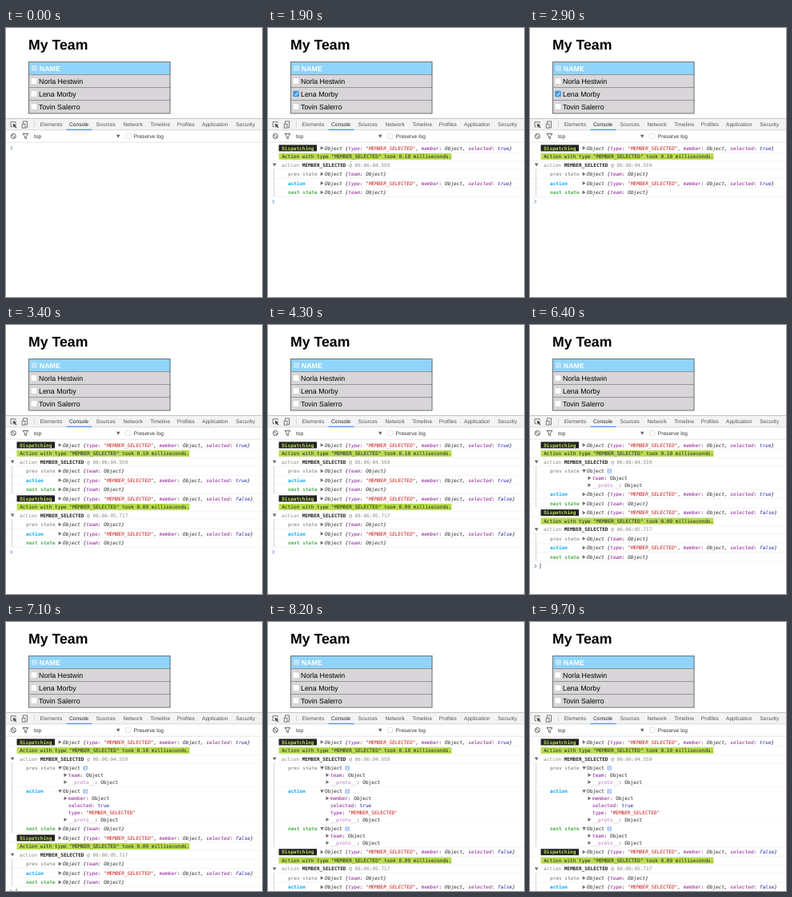
An HTML page that plays this animation: 320x337 px, repeating every 9800 ms.

```html
<!DOCTYPE html>
<html lang="en">
<head>
<meta charset="utf-8">
<title>My Team</title>
<style>
  html, body { margin: 0; width: 100%; height: 100%; overflow: hidden; background: #fff; }
  svg { display: block; width: 320px; height: 337px; }
  text { white-space: pre; text-rendering: geometricPrecision; }
  .ui { font-family: "Liberation Sans", Arial, sans-serif; }
  .mono { font: 6.08px "DejaVu Sans Mono", monospace; }
  .b { font-weight: bold; }
  .i { font-style: italic; }
</style>
</head>
<body>
<svg id="stage" viewBox="0 0 320 337" xmlns="http://www.w3.org/2000/svg">
  <g id="page"></g>
  <g id="tools"></g>
  <g id="log"></g>
</svg>
<script>
const LOOP = 9800;
const CHAR = 3.66;
const CHILD = 8.85;

// Moments of the clicks, in ms
const AT = { select: 1900, deselect: 3100, prev: 6100, action: 7000, next: 8000 };

const KEY = '#881391', STR = '#c41a16', BOOL = '#1c1fa8', INK = '#222', GREY = '#888';
const LIME = '#b9dc50';
const $ = id => document.getElementById(id);

const rect = (x, y, w, h, fill, more = '') =>
  `<rect x="${x}" y="${y}" width="${w}" height="${h}" fill="${fill}" ${more}/>`;
const path = (d, stroke, width = 1, fill = 'none') =>
  `<path d="${d}" stroke="${stroke}" stroke-width="${width}" fill="${fill}"/>`;
const ui = (x, y, size, s, fill = '#000', cls = '') =>
  `<text class="ui ${cls}" x="${x}" y="${y}" font-size="${size}" fill="${fill}">${s}</text>`;
// runs: [text, colour, classes]
const mono = (x, mid, ...runs) =>
  `<text class="mono" x="${x}" y="${mid + 2.1}">` +
  runs.map(([s, fill = INK, cls = '']) => `<tspan fill="${fill}" class="${cls}">${s}</tspan>`).join('') +
  '</text>';
const closed = (x, y) => path(`M${x} ${y - 2.4}l3.8 2.4l-3.8 2.4z`, 'none', 0, '#6e6e6e');
const open = (x, y) => path(`M${x} ${y - 1.9}h4.8l-2.4 3.9z`, 'none', 0, '#6e6e6e');

function checkbox(x, y, size, on) {
  if (!on) return rect(x, y, size, size, '#fff', 'rx="1.3" stroke="#c4c4c4" stroke-width=".5"');
  return rect(x, y, size, size, '#3c98e8', 'rx="1.3"') +
    path(`M${x + 1.8} ${y + 4}l1.7 1.9l2.7 -4.2`, '#fff', 1);
}

function drawPage(checked) {
  const names = ['Norla Hestwin', 'Lena Morby', 'Tovin Salerro'];
  let out = ui(28, 26.8, 17.7, 'My Team', '#000', 'b');
  out += rect(28, 42, 177.5, 65.3, '#d8d6d8') + rect(28, 42, 177.5, 16.3, '#90d3fb');
  out += rect(32, 47, 7, 7, '#c6e8fc', 'rx="1"') +
    path('M33 49h5M33 51h5M33 53h5', '#a4d8f6', .6);
  out += ui(41.8, 53.6, 8.85, 'NAME', '#fff', 'b');
  names.forEach((name, i) => {
    const y = 58.5 + 16 * i;
    out += path(`M28 ${y}h177.5`, '#8e8c8e', .9);
    out += checkbox(31.2, y + 4.2, 7.6, checked && i === 1);
    out += ui(41, y + 11, 8.85, name);
  });
  return out + rect(28.5, 42.5, 176.5, 64.5, 'none', 'stroke="#6f7478"');
}

function drawTools() {
  const tabs = [[42.6, 'Elements'], [79, 'Console'], [112.6, 'Sources'], [146.5, 'Network'],
    [180.3, 'Timeline'], [213.8, 'Profiles'], [245, 'Application'], [287.3, 'Security']];
  let out = rect(0, 113, 320, 15, '#f3f3f3') + rect(0, 113, 320, .8, '#b8b8b8');
  out += rect(0, 127.5, 320, .7, '#cbcbcb') + rect(0, 142.8, 320, .7, '#dcdcdc');
  out += tabs.map(([x, s]) => ui(x, 122.8, 6.63, s, s === 'Console' ? '#222' : '#555')).join('');
  out += rect(75.5, 126.8, 32, 1.2, '#4b92ee');
  out += rect(35, 116.5, .7, 8.5, '#ccc');
  // Inspect and device icons
  out += path('M12 119.5v-1.8h-6v6h2', '#5a5a5a', .8) +
    path('M8.6 119.8l4.8 2l-2 .8l2 2l-.9 .8l-2 -2l-.8 1.8z', 'none', 0, '#444');
  out += path('M21.5 119.5v-2.6h5v8h-2', '#5a5a5a', .8) + rect(20.2, 120.2, 3.8, 5, 'none', 'stroke="#5a5a5a" stroke-width=".8"');
  // Clear and filter icons
  out += '<circle cx="9.3" cy="135.5" r="3" fill="none" stroke="#555" stroke-width="1"/>' +
    path('M7.2 133.4l4.2 4.2', '#555', 1);
  out += path('M21 132.5h6.8l-2.5 3.2v3l-1.8 -.9v-2.1z', '#555', .9);
  out += ui(35, 137.8, 6.63, 'top', '#333') + path('M138 133.8h4.6l-2.3 4z', 'none', 0, '#666');
  return out + checkbox(149.8, 132.3, 6.2, false) + ui(159.8, 137.8, 6.63, 'Preserve log', '#333');
}

const rule = y => rect(0, y + 5.2, 320, .55, '#ededed');
const it = (s, fill) => [s, fill, 'i'];

function actionObject(y, flag) {
  return closed(65.7, y) + mono(71, y, it('Object {'), it('type', KEY), it(': '),
    it('"MEMBER_SELECTED"', STR), it(', '), it('member', KEY), it(': Object, '),
    it('selected', KEY), it(': '), it(flag, BOOL), it('}'));
}
const stateObject = y => closed(65.7, y) +
  mono(71, y, it('Object {'), it('team', KEY), it(': Object}'));

// children: [key, value, colour, expandable]
function expanded(y, children) {
  let out = open(65.2, y) + mono(71, y, ['Object']);
  out += rect(96.3, y - 2.8, 5.8, 5.6, '#a9c9f0', 'rx="1"') +
    rect(98.8, y - .6, .9, 2.4, '#fff') + rect(98.8, y - 2, .9, .9, '#fff');
  children.forEach(([key, value, fill, more], i) => {
    const c = y + CHILD * (i + 1);
    if (more) out += closed(72.5, c);
    out += mono(78, c, [key, key === '__proto__' ? '#b871bd' : KEY], [': '], [value, fill]);
  });
  return out;
}

const PROTO = ['__proto__', 'Object', INK, true];
const TEAM = [['team', 'Object', INK, true], PROTO];
const MEMBER = [['member', 'Object', INK, true], ['selected', 'true', BOOL],
  ['type', '"MEMBER_SELECTED"', STR], PROTO];

// Draws one dispatched action; returns its markup and the next row's middle
function entry(y, { flag, took, time, shown }) {
  let out = rect(13.5, y - 4, 13 * CHAR, 8, '#222') +
    mono(13.5 + CHAR, y, ['Dispatching', LIME, 'b']) + actionObject(y, flag) + rule(y);
  y += 10.5;
  out += rect(13.5, y - 4, 59 * CHAR, 8, LIME) +
    mono(13.5 + CHAR, y, [`Action with type "MEMBER_SELECTED" took ${took} milliseconds.`]) + rule(y);
  y += 10.6;
  out += open(5.7, y) + mono(17, y, ['action ', GREY], ['MEMBER_SELECTED', INK, 'b'],
    [` @ ${time}`, GREY]) + rule(y);
  const top = y + 5;
  y += 11.4;
  const rows = [
    ['prev state', '#9e9e9e', TEAM, stateObject],
    ['action', '#03a9f4', MEMBER, c => actionObject(c, flag)],
    ['next state', '#4caf50', TEAM, stateObject]
  ];
  rows.forEach(([label, fill, children, summary], i) => {
    out += mono(25, y, [label, fill, 'b']);
    out += shown > i ? expanded(y, children) : summary(y);
    if (shown > i) y += CHILD * children.length;
    out += rule(y);
    y += 11.5;
  });
  out += rect(7.3, top, .7, y - 6.5 - top, '#c4c4c4');
  return [out, y];
}

function drawLog(count, shown) {
  const entries = [
    { flag: 'true', took: '0.10', time: '06:06:04.559', shown },
    { flag: 'false', took: '0.09', time: '06:06:05.717', shown: 0 }
  ];
  let y = 150.4, out = '';
  for (const e of entries.slice(0, count)) {
    const [markup, next] = entry(y, e);
    out += markup;
    y = next;
  }
  out += path(`M5.6 ${y - 2.2}l2.2 2.2l-2.2 2.2`, '#4a7bd0', 1);
  if (shown) out += rect(12.6, y - 3.6, .7, 7, '#333');
  return out;
}

$('tools').innerHTML = drawTools();

const start = performance.now();
let last = -1;
function frame() {
  const t = Math.max(0, performance.now() - start) % LOOP;
  const step = Object.values(AT).filter(at => t >= at).length;
  if (step !== last) {
    last = step;
    $('page').innerHTML = drawPage(step === 1);
    $('log').innerHTML = drawLog(Math.min(step, 2), Math.max(0, step - 2));
  }
  requestAnimationFrame(frame);
}
frame();
</script>
</body>
</html>
```
